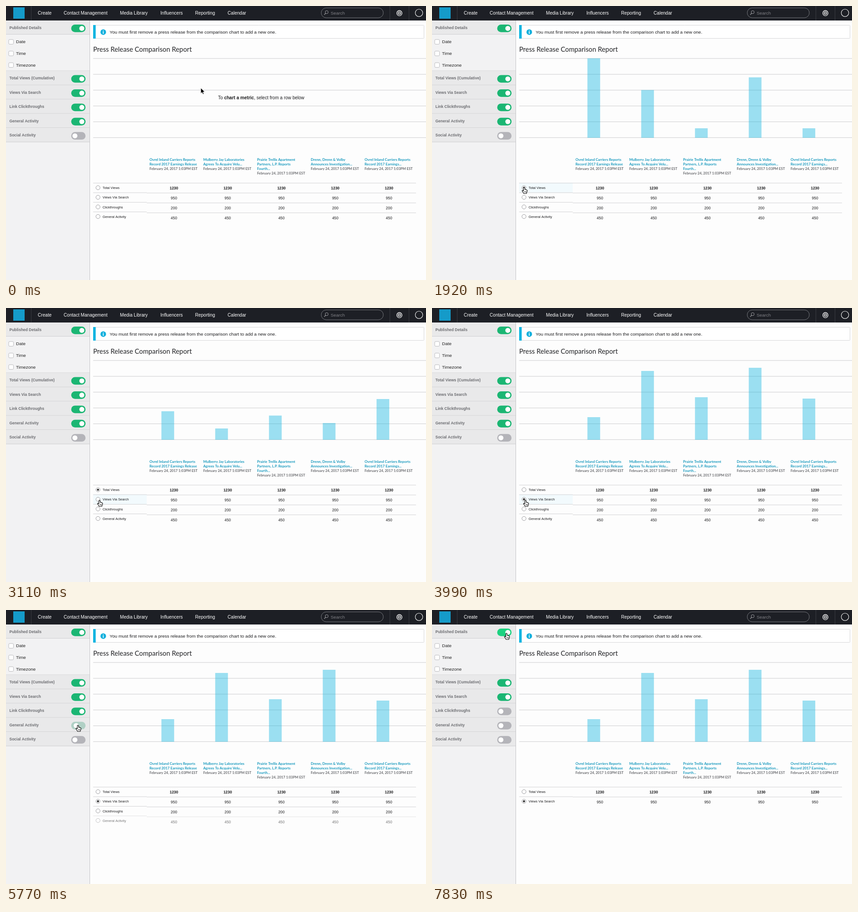
An HTML page with a canvas for the animation above (8000 ms loop, 925x605 px).

```html
<!DOCTYPE html>
<html lang="en">
<head>
<meta charset="utf-8">
<title>Comparison report</title>
<style>
html, body { margin: 0; width: 100%; height: 100%; overflow: hidden; background: #fdfdfd; }
canvas { display: block; }
</style>
</head>
<body>
<canvas id="stage" width="925" height="605"></canvas>
<script>
const ctx = document.getElementById('stage').getContext('2d');
const LOOP = 8000, TICK = 148, LAST = 53;
const SANS = '"Liberation Sans", Arial, sans-serif';
const LATO = 'Lato, sans-serif';
const GREEN = [27, 182, 115], BRIGHT = [28, 210, 128];
const GREY = [180, 180, 185], PALE = [208, 208, 212];
const STEP = 118.45;

// Ticks at which things are clicked
const PICK_VIEWS = 11, PICK_SEARCH = 23, GENERAL_OFF = 39, LINKS_OFF = 47;

// Cursor moves: start tick, end tick, destination
const MOVES = [
  [0, 3, 160, 399], [4, 6, 186, 405], [6, 8, 203, 400],
  [16, 18, 203, 417], [18, 21, 206, 424], [30, 36, 158.5, 254],
  [42, 44, 159, 213], [44, 45, 158.5, 222], [48, 53, 164, 51]
];

// Bar tops for each chart state
const CHARTS = [
  [115.5, 185.5, 270, 157.5, 270],
  [228, 266, 237.5, 254, 201],
  [241, 139, 197, 132, 200]
];

const NAV = [['Create', 70], ['Contact Management', 127], ['Media Library', 251],
  ['Influencers', 340], ['Reporting', 416.5], ['Calendar', 488]];
const SECTIONS = ['Total Views (Cumulative)', 'Views Via Search', 'Link Clickthroughs',
  'General Activity', 'Social Activity'];
const ROWS = [['Total Views', '1230'], ['Views Via Search', '950'],
  ['Clickthroughs', '200'], ['General Activity', '450']];
const RELEASES = [
  ['Ovrel Inland Carriers Reports', 'Record 2017 Earnings Release'],
  ['Mulberry Jay Laboratories', 'Agrees To Acquire Velu...'],
  ['Prairie Trellis Apartment', 'Partners, L.P. Reports', 'Fourth...'],
  ['Drenn, Drenn & Volby', 'Announces Investigation...'],
  ['Ovrel Inland Carriers Reports', 'Record 2017 Earnings...']
];

const clamp = v => Math.max(0, Math.min(1, v));
const smooth = v => { v = clamp(v); return v * v * (3 - 2 * v); };
const lerp = (a, b, p) => a + (b - a) * p;
const mix = (a, b, p) => `rgb(${a.map((v, i) => Math.round(lerp(v, b[i], p)))})`;

function rect(x, y, w, h, color) {
  ctx.fillStyle = color;
  ctx.fillRect(x, y, w, h);
}

function text(str, x, y, size, color, weight = 400, family = SANS, align = 'left') {
  ctx.font = `${weight} ${size}px ${family}`;
  ctx.textAlign = align;
  ctx.fillStyle = color;
  ctx.fillText(str, x, y);
}

function paint(fill, stroke, width = 1) {
  if (fill) { ctx.fillStyle = fill; ctx.fill(); }
  if (stroke) { ctx.strokeStyle = stroke; ctx.lineWidth = width; ctx.stroke(); }
}

function disc(x, y, r, fill, stroke, width) {
  ctx.beginPath();
  ctx.arc(x, y, r, 0, Math.PI * 2);
  paint(fill, stroke, width);
}

function pill(x, y, w, h, r, fill, stroke, width) {
  ctx.beginPath();
  ctx.roundRect(x, y, w, h, r);
  paint(fill, stroke, width);
}

function poly(points, fill, stroke, width) {
  ctx.beginPath();
  points.forEach(([x, y]) => ctx.lineTo(x, y));
  ctx.closePath();
  paint(fill, stroke, width);
}

function cursorAt(k) {
  let x = 429, y = 181;
  for (const [from, to, tx, ty] of MOVES) {
    const p = smooth((k - from) / (to - from));
    x = lerp(x, tx, p);
    y = lerp(y, ty, p);
  }
  return { x, y };
}

function drawNav() {
  rect(0, 0, 925, 32, '#1d1f25');
  for (const x of [55, 845, 887]) rect(x, 0, 1, 32, '#3a3c42');
  rect(16, 3, 25, 25, '#159bc9');
  for (const [label, x] of NAV) text(label, x, 18.5, 10.1, '#fff');

  pill(694.2, 4.2, 136.8, 21.8, 10.9, '#1d1f25', '#77797e');
  disc(706.3, 13.6, 3.3, null, '#a0a1a5');
  ctx.beginPath();
  ctx.moveTo(704, 16);
  ctx.lineTo(700.8, 19.4);
  paint(null, '#a0a1a5', 1.3);
  text('Search', 715, 18.8, 9.9, '#808186');

  disc(866.4, 15.8, 5.8, null, '#fff', 1.3);
  disc(866.4, 15.8, 2.9, null, '#fff', 1.3);
  disc(866.4, 15.8, 1, '#fff');
  disc(909.6, 15.2, 8.2, null, '#e8e8e8', 1.2);
}

const toggleY = i => i < 0 ? 49.4 : 160.9 + i * 31.45;

function overToggle(c, i) {
  return c.x >= 144 && c.x <= 175 && Math.abs(c.y - toggleY(i)) < 8;
}

function drawToggle(i, off, hover) {
  const y = toggleY(i);
  pill(143.6, y - 8.4, 31.6, 16.8, 8.4, mix(hover ? BRIGHT : GREEN, hover ? PALE : GREY, off));
  disc(lerp(167, 151.8, off), y, 5.5, '#fff');
}

function drawSection(label, top, height) {
  rect(0, top, 184, height, '#e9e9ea');
  rect(0, top + height - 1, 184, 1, '#cfcfd1');
  text(label, 7.5, top + 18.9, 8.47, '#6c6d71', 700);
}

function drawSidebar(k, c) {
  rect(0, 32, 184, 573, '#f2f2f3');
  drawSection('Published Details', 32, 31);
  ['Date', 'Time', 'Timezone'].forEach((label, i) => {
    const y = 79 + i * 25.6;
    pill(6, y - 5, 10.4, 10.4, 2, '#fff', '#b9b9bc');
    text(label, 22, y + 3.4, 9.95, '#222');
  });
  rect(0, 142.5, 184, 1, '#cfcfd1');
  SECTIONS.forEach((label, i) => drawSection(label, 143.4 + i * 31.45, 31.45));
  rect(184, 32, 1, 573, '#c3c3c6');

  const off = [0, 0, clamp(k - LINKS_OFF + 0.82), clamp(k - GENERAL_OFF + 0.82), 1];
  drawToggle(-1, 0, overToggle(c, -1));
  off.forEach((p, i) => drawToggle(i, p, overToggle(c, i)));
}

function drawBanner() {
  pill(192.5, 42.5, 728, 29, 1, '#fff', '#d6d6d8');
  rect(192, 42, 5.5, 30, '#02b3e0');
  disc(214.2, 57.7, 6.2, '#12b0dd');
  rect(213.4, 54, 1.7, 1.7, '#fff');
  rect(213.4, 56.6, 1.7, 4.8, '#fff');
  text('You must first remove a press release from the comparison chart to add a new one.',
    228.2, 61.2, 9.96, '#1c1c1e');
  text('Press Release Comparison Report', 192, 101.4, 14.8, '#222326', 400, LATO);
}

function drawPrompt() {
  let x = 467;
  for (const [part, weight] of [['To ', 400], ['chart a metric', 700], [', select from a row below', 400]]) {
    text(part, x, 205.6, 10.04, '#1c1c1e', weight);
    x += ctx.measureText(part).width;
  }
}

function drawChart(k) {
  for (let i = 0; i < 6; i++) rect(192, 115.4 + i * 34.95, 733, 1, '#cbcbcd');
  if (k < PICK_VIEWS) return drawPrompt();
  const toSecond = smooth((k - 13) / 3);
  const toThird = smooth((k - PICK_SEARCH + 0.5) / 4.5);
  ctx.globalAlpha = clamp((k - PICK_VIEWS + 0.2) * 0.46);
  for (let i = 0; i < 5; i++) {
    const top = lerp(lerp(CHARTS[0][i], CHARTS[1][i], toSecond), CHARTS[2][i], toThird);
    rect(342.3 + i * STEP, top, 28, 291 - top, 'rgba(2,176,222,.39)');
  }
  ctx.globalAlpha = 1;
}

function drawReleases() {
  RELEASES.forEach((lines, i) => {
    const x = 316 + i * STEP;
    lines.forEach((line, n) => text(line, x, 341.8 + n * 9.95, 7.8, '#1598bd', 700, LATO));
    text('February 24, 2017 1:03PM EST', x, 341.8 + lines.length * 9.95, 7.6, '#67686c', 700, LATO);
  });
}

function drawTable(k, c) {
  const picked = k < PICK_VIEWS ? -1 : k < PICK_SEARCH ? 0 : 1;
  const fade = start => clamp(1 - (k - start + 0.9) * 0.45);
  const alphas = [1, 1, fade(LINKS_OFF), fade(GENERAL_OFF)];
  ROWS.forEach(([label, value], i) => {
    const left = 390.5 + i * 21.2, right = 390.5 + i * 21.9;
    const weight = i ? 400 : 700;
    ctx.globalAlpha = alphas[i];
    if (c.x >= 192 && c.x < 310 && c.y >= left && c.y < left + 21.2) {
      rect(192, left, 118, 21.2, '#f2fafd');
    }
    rect(192, left, 118, 1, '#d2d2d4');
    rect(310, right, 593, 1, '#d2d2d4');
    disc(202.6, left + 10.7, 4.5, '#fff', '#8d8d91', 0.9);
    if (picked === i) disc(202.6, left + 10.7, 2.3, '#333');
    text(label, 212.7, left + 13.6, 7.4, '#1c1c1e');
    for (let n = 0; n < 5; n++) {
      text(value, 369.8 + n * STEP, right + 14.5, 8.4, '#1c1c1e', weight, SANS, 'center');
    }
  });
  ctx.globalAlpha = 1;
}

function drawArrow() {
  poly([[0, 0], [0, 12.2], [2.8, 9.6], [4.8, 14], [6.8, 13.1], [4.9, 8.9], [8.7, 8.7]],
    '#000', '#fff', 0.8);
}

function drawHand() {
  ctx.beginPath();
  ctx.moveTo(-1.4, 8.4);
  ctx.lineTo(-1.4, 1.4);
  ctx.quadraticCurveTo(0, -0.8, 1.4, 1.4);
  ctx.lineTo(1.4, 5);
  ctx.quadraticCurveTo(3, 4.2, 3.4, 5.6);
  ctx.quadraticCurveTo(4.9, 4.9, 5.2, 6.3);
  ctx.quadraticCurveTo(6.8, 5.9, 6.8, 7.6);
  ctx.quadraticCurveTo(6.8, 10.2, 5.5, 12);
  ctx.lineTo(5.3, 14);
  ctx.lineTo(-1, 14);
  ctx.quadraticCurveTo(-1.8, 11.6, -4.4, 8.6);
  ctx.quadraticCurveTo(-5, 6.6, -3, 7);
  ctx.closePath();
  paint('#fff', '#000', 1.1);
  for (const x of [0.6, 2.3, 4]) rect(x, 8.8, 0.7, 2.9, '#000');
}

function drawCursor(c) {
  const overRow = c.x >= 192 && c.x < 310 && c.y > 390 && c.y < 475;
  const overSwitch = [-1, 0, 1, 2, 3, 4].some(i => overToggle(c, i));
  ctx.save();
  ctx.translate(c.x, c.y);
  ctx.lineJoin = 'round';
  if (overRow || overSwitch) drawHand();
  else drawArrow();
  ctx.restore();
}

function draw(t) {
  const k = Math.min(LAST, Math.floor((t + 14) / TICK));
  const c = cursorAt(k);
  rect(0, 0, 925, 605, '#fdfdfd');
  drawBanner();
  drawChart(k);
  drawReleases();
  drawTable(k, c);
  drawSidebar(k, c);
  drawNav();
  drawCursor(c);
}

const start = performance.now();
function loop() {
  draw((performance.now() - start) % LOOP);
  requestAnimationFrame(loop);
}
loop();
</script>
</body>
</html>
```
